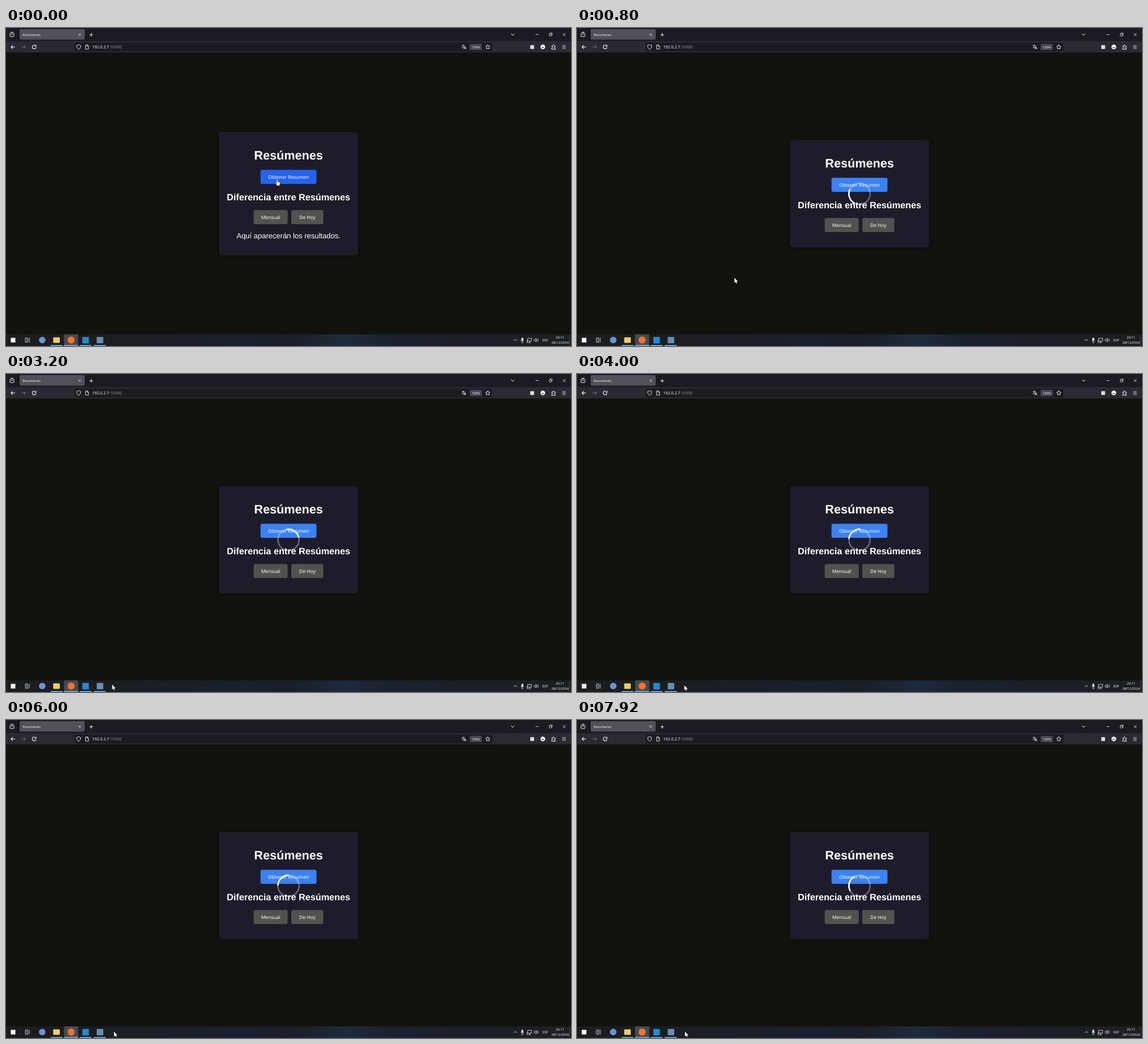
Recreate the animation shown at these times as an HTML page with a canvas. Size 998 by 561 pixels, loop 8 s.

```html
<!DOCTYPE html>
<html lang="es">
<head>
<meta charset="utf-8">
<title>Resumenes</title>
<style>
  html, body { margin: 0; width: 100%; height: 100%; overflow: hidden; background: #12130e; }
  canvas { display: block; width: 998px; height: 561px; }
</style>
</head>
<body>
<canvas id="stage"></canvas>
<script>
const W = 998, H = 561, LOOP = 8000;
const CLICK = 200;
const UI = '"Noto Sans", "Open Sans", sans-serif';
const PAGE = '"Liberation Sans", Arial, sans-serif';
const LIGHT = '#f3f3f6';

const canvas = document.getElementById('stage');
const ratio = window.devicePixelRatio || 1;
canvas.width = Math.round(W * ratio);
canvas.height = Math.round(H * ratio);
const ctx = canvas.getContext('2d');
ctx.scale(ratio, ratio);
if ('textRendering' in ctx) ctx.textRendering = 'geometricPrecision';

function rect(x, y, w, h, color, r = 0) {
  ctx.fillStyle = color;
  ctx.beginPath();
  ctx.roundRect(x, y, w, h, r);
  ctx.fill();
}

function box(x, y, w, h, color = LIGHT, lw = 0.9, r = 0.8) {
  ctx.strokeStyle = color;
  ctx.lineWidth = lw;
  ctx.beginPath();
  ctx.roundRect(x, y, w, h, r);
  ctx.stroke();
}

function dot(x, y, r, color) {
  ctx.fillStyle = color;
  ctx.beginPath();
  ctx.arc(x, y, r, 0, Math.PI * 2);
  ctx.fill();
}

function arc(x, y, r, from, to, color, lw) {
  ctx.strokeStyle = color;
  ctx.lineWidth = lw;
  ctx.beginPath();
  ctx.arc(x, y, r, from, to);
  ctx.stroke();
}

function line(d, color = LIGHT, lw = 0.9) {
  ctx.strokeStyle = color;
  ctx.lineWidth = lw;
  ctx.stroke(new Path2D(d));
}

function text(str, x, y, size, font, color, align = 'left', weight = 400) {
  ctx.font = `${weight} ${size}px ${font}`;
  ctx.textAlign = align;
  ctx.fillStyle = color;
  ctx.fillText(str, x, y);
}

function cross(x, y, r, color, lw) {
  line(`M${x - r} ${y - r}l${2 * r} ${2 * r}m0 ${-2 * r}l${-2 * r} ${2 * r}`, color, lw);
}

function drawTabs() {
  rect(0, 0, W, 23, '#1c1b22');
  rect(21.8, 0, 1, 23, '#0f0e14');
  box(7, 9.2, 7, 6, LIGHT, 1, 1.2);
  line('M8 7.4h5M9.2 11.6h2.6', LIGHT, 0.9);
  rect(24, 2, 115, 18.5, '#51505b', 2);
  text('Resumenes', 29.6, 14, 5.75, UI, LIGHT);
  cross(130.2, 11.6, 2, LIGHT, 0.8);
  line('M147.4 12h6.4M150.6 8.8v6.4', LIGHT, 1);
  line('M892 10l3 3 3-3', LIGHT, 1);
  line('M935.4 11.6h5.2', LIGHT, 0.8);
  box(959.6, 10.2, 3.8, 3.8, LIGHT, 0.8, 0.3);
  line('M961 10.2v-1.4h3.8v3.8h-1.4', LIGHT, 0.7);
  cross(986, 11.6, 2.4, LIGHT, 0.8);
}

function drawToolbar() {
  rect(0, 23, W, 20.5, '#2b2a33');
  rect(0, 43, W, 0.6, '#0c0c10');
  line('M16 33.5h-7M12 30.4l-3.1 3.1 3.1 3.1', LIGHT, 1.1);
  line('M27.5 33.5h7M31.5 30.4l3.1 3.1-3.1 3.1', '#74737c', 1);
  arc(49.8, 33.4, 3.3, 0.2, 5.5, LIGHT, 1.1);
  line('M53.2 29.6v3h-3', LIGHT, 1);

  rect(121, 25.8, 738, 15.4, '#1c1b22', 2);
  line('M128.3 29.4l3.5 1.3c.2 3.2-.9 5.7-3.5 7-2.6-1.3-3.7-3.8-3.5-7z', LIGHT, 0.9);
  line('M140.6 29.8h3l2.2 2.2v5.2h-5.2zM143.4 29.8v2.4h2.4', LIGHT, 0.9);
  text('192.0.2.7', 152.3, 36.2, 7.05, UI, '#f0f0f4');
  text(':10000', 182.2, 36.2, 7.05, UI, '#8f8e97');

  line('M805 30.8h5M807.5 29.5v1.3M809 30.8c-.5 2-2 3.6-4 4.4M806 32.4c.6 1.2 1.6 2 3 2.5', LIGHT, 0.8);
  line('M808.6 37.4l2-5 2 5M809.3 35.8h2.6', LIGHT, 0.9);
  rect(819, 28, 21.5, 11, '#484751', 1.6);
  text('130%', 829.7, 35.8, 5.7, UI, LIGHT, 'center');

  ctx.beginPath();
  for (let i = 0; i < 10; i++) {
    const a = i * Math.PI / 5 - Math.PI / 2, r = i % 2 ? 2 : 4.2;
    ctx.lineTo(851 + r * Math.cos(a), 33.6 + r * Math.sin(a));
  }
  ctx.closePath();
  ctx.strokeStyle = LIGHT;
  ctx.lineWidth = 0.9;
  ctx.stroke();

  rect(926, 30.2, 6.8, 6.8, '#dcdce2', 1);
  dot(948.2, 33.4, 4.2, '#f4f4f4');
  rect(946.2, 33.8, 4, 1.5, '#3c3b44', 0.7);
  line('M963.8 32h2v-1a1.2 1.2 0 0 1 2.4 0v1h2.2v2h-1a1.1 1.1 0 0 0 0 2.2h1v1.4h-6.6v-2.2h1a1.1 1.1 0 0 0 0-2.2h-1z', LIGHT, 0.9);
  line('M982.4 31h6.2M982.4 33.5h6.2M982.4 36h6.2', LIGHT, 0.8);
}

function drawTaskbar() {
  const g = ctx.createLinearGradient(0, 0, W, 0);
  [[0, '#1b1d1f'], [0.2, '#1b1e22'], [0.34, '#1b1f29'], [0.42, '#1a212d'], [0.5, '#1a1e28'],
   [0.6, '#1d2b3c'], [0.68, '#1a2230'], [0.8, '#1c1f27'], [1, '#1d1f22']]
    .forEach(([p, c]) => g.addColorStop(p, c));
  rect(0, 540.5, W, 20.5, g);
  rect(102.5, 540.5, 25, 20.5, '#484b4d');
  [[79, 21], [102.5, 25], [130, 21], [155, 21]].forEach(([x, w]) => rect(x, 559.4, w, 1.6, '#76b9ed'));

  rect(8.4, 546.6, 8.2, 8.2, '#f5f5f5');
  box(34, 548.8, 5, 3.6, '#e4e4e4', 0.8, 0);
  line('M33.6 546.8h5.8M33.6 554.6h5.8M41.2 546.4v8.4', '#e4e4e4', 0.8);
  dot(64, 550.5, 5.8, '#6a92d6');
  rect(83.4, 545.8, 11.6, 9.6, '#f4cd62', 0.8);
  dot(115, 550.5, 6.2, '#fb7130');
  rect(134.8, 545, 11.6, 11.4, '#2489d2', 1);
  rect(160.2, 545, 11.6, 11.2, '#668fb1', 1);

  line('M897 552l2.8-2.8 2.8 2.8', '#eeeeee', 0.9);
  rect(910.4, 546.2, 3.2, 5.6, '#eeeeee', 1.6);
  line('M909.4 550.4c0 3.4 5.2 3.4 5.2 0M912 553v2.2M910.3 555.1h3.4', '#eeeeee', 0.7);
  box(921.4, 547.4, 7, 5, '#eeeeee', 0.8, 0.2);
  line('M923 555h4M925 552.4v2.6M920.5 550.5v4.6h2', '#eeeeee', 0.8);
  line('M933 549.3h1.5l2-2v6.6l-2-2h-1.5z', '#eeeeee', 0.8);
  arc(936.4, 550.6, 2.2, -0.8, 0.8, '#eeeeee', 0.7);
  arc(936.4, 550.6, 4, -0.8, 0.8, '#eeeeee', 0.7);
  text('ESP', 952.4, 552.7, 6, UI, LIGHT, 'center');
  text('20:11', 978.5, 548, 5.8, UI, LIGHT, 'center');
  text('28/12/2024', 978.7, 557.4, 5.75, UI, LIGHT, 'center');
  rect(995.2, 541, 0.6, 20, '#5b5d60');
}

function button(label, x, y, w, color) {
  rect(x, y, w, 24.7, color, 3);
  text(label, x + w / 2, y + 15.6, 8.4, UI, '#ffffff', 'center');
}

function drawCard(loading, hover) {
  const dy = loading ? 14 : 0;
  ctx.save();
  ctx.shadowColor = 'rgba(0,0,0,.55)';
  ctx.shadowBlur = 8 * ratio;
  rect(376, 183.5 + dy, 246.2, loading ? 189.5 : 217.5, '#1e1c2a', 5);
  ctx.restore();
  text('Resúmenes', 499, 231.5 + dy, 21.63, PAGE, '#ffffff', 'center', 700);
  button('Obtener Resumen', 449.6, 250.3 + dy, 98.8, hover ? '#2563eb' : '#3b82f6');
  text('Diferencia entre Resúmenes', 499, 304 + dy, 16.22, PAGE, '#ffffff', 'center', 700);
  button('Mensual', 437.5, 321.3 + dy, 60, '#52534f');
  button('De Hoy', 504, 321.3 + dy, 56.5, '#52534f');
  if (!loading) text('Aquí aparecerán los resultados.', 499, 371.4, 13, PAGE, '#ffffff', 'center');
}

function drawSpinner(t) {
  const turn = (t * 0.3587 - 36) * Math.PI / 180 - Math.PI / 2;
  const q = Math.PI / 4;
  arc(499, 292.6, 18.7, turn + q, turn + 7 * q, 'rgba(255,255,255,.32)', 2.7);
  arc(499, 292.6, 18.7, turn - q, turn + q, '#ffffff', 2.7);
}

// time, x, y of the pointer tip
const path = [
  [0, 478.3, 267], [CLICK, 478.3, 267], [400, 430, 312], [600, 344, 386], [800, 278.3, 440.6],
  [1050, 226, 505], [1450, 186.3, 547.2], [2700, 186.3, 547.2], [3100, 187.5, 548],
  [3650, 187.5, 548], [4200, 190.7, 549.8], [LOOP, 190.7, 549.8]
];

function pointerAt(t) {
  const i = Math.max(1, path.findIndex(p => p[0] >= t));
  const [t0, x0, y0] = path[i - 1], [t1, x1, y1] = path[i];
  const k = (t - t0) / (t1 - t0);
  return [x0 + (x1 - x0) * k, y0 + (y1 - y0) * k];
}

const ARROW = new Path2D('M0 0v8.7l2-1.9 1.4 3 1.4-.6-1.4-2.9h2.7z');
const HAND = new Path2D('M0 .7c0-1 1.5-1 1.5 0v3.5l3 .7q1.2.3 1.1 1.6l-.5 2.3-.5 2.2h-4.1l-2.2-3.4c-.6-1 .5-1.6 1.2-.8l.5.6z');

function drawPointer(x, y, hand) {
  ctx.save();
  ctx.translate(x, y);
  const shape = hand ? HAND : ARROW;
  ctx.lineJoin = 'round';
  ctx.lineWidth = 0.9;
  ctx.strokeStyle = '#08080a';
  ctx.stroke(shape);
  ctx.fillStyle = '#ffffff';
  ctx.fill(shape);
  ctx.restore();
}

function draw(t) {
  const loading = t >= CLICK;
  const [x, y] = pointerAt(t);
  const hover = y < 289 && x > 449;
  rect(0, 0, W, H, '#12130e');
  drawTabs();
  drawToolbar();
  drawCard(loading, hover);
  if (loading) drawSpinner(t);
  drawTaskbar();
  drawPointer(x, y, hover);
}

const start = performance.now();
function tick() {
  draw((performance.now() - start) % LOOP);
  requestAnimationFrame(tick);
}
tick();
</script>
</body>
</html>
```
